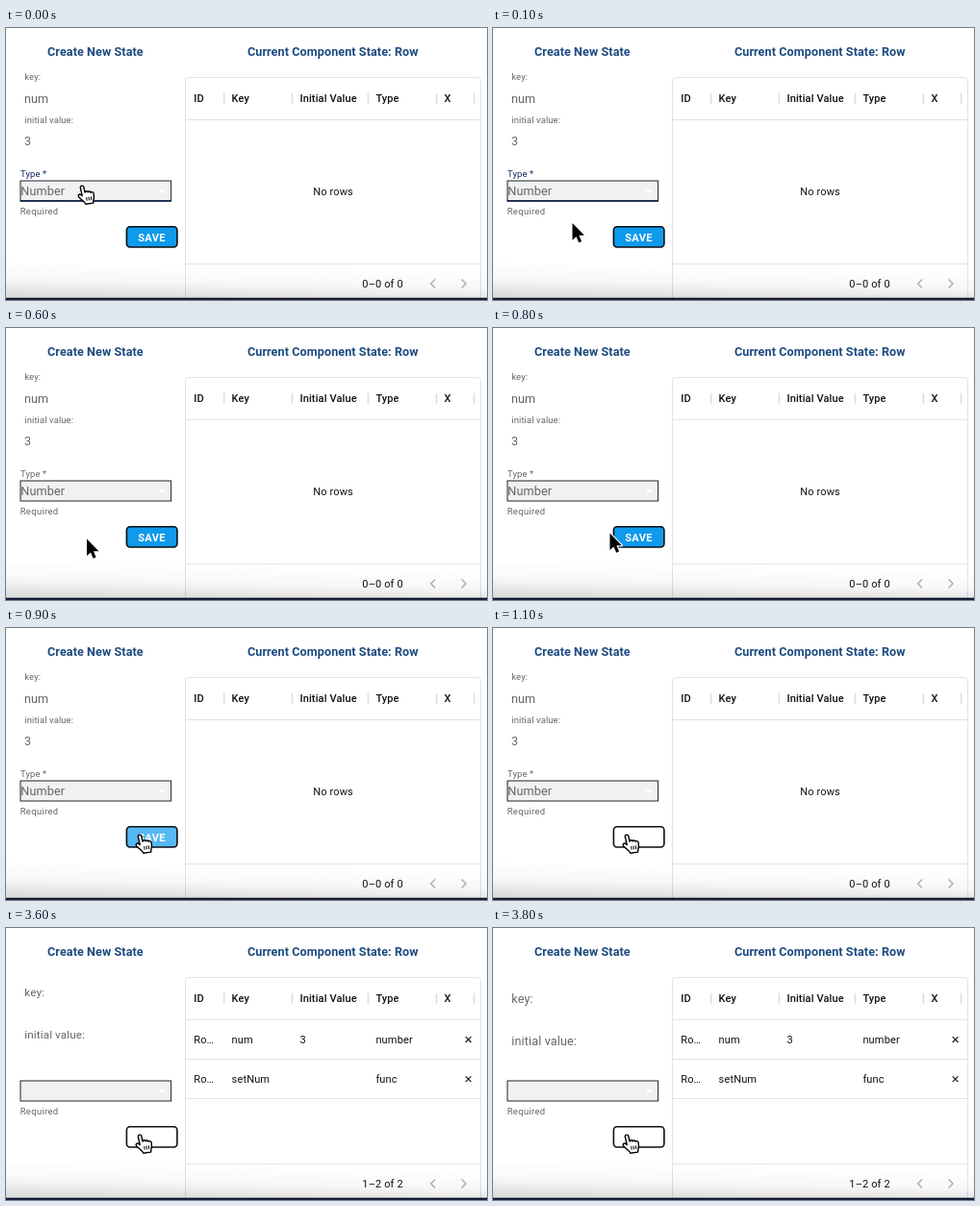
An HTML page with a canvas for the animation above (6980 ms loop, 500 by 283 pixels).

```html
<!DOCTYPE html>
<html lang="en">
<head>
<meta charset="utf-8">
<title>State manager</title>
<style>
  html, body { margin: 0; width: 100%; height: 100%; overflow: hidden; background: #fff; }
  canvas { display: block; width: 500px; height: 283px; }
</style>
</head>
<body>
<canvas id="stage"></canvas>
<script>
const W = 500, H = 283, LOOP = 6980, STEP = 100;
const canvas = document.getElementById('stage');
const ctx = canvas.getContext('2d');
const dpr = window.devicePixelRatio || 1;
canvas.width = W * dpr;
canvas.height = H * dpr;

const BODY = 12.64, CELL = 11.06, SMALL = BODY * 0.75;
const GREY = '#666', INK = '#111', RULE = '#e3e3e3', NAVY = '#1d4b80';
const COLS = [187.3, 226.7, 297.5, 376.5, 447.5];
const PAD = 7.9;

const clamp = v => Math.max(0, Math.min(1, v));
const mix = (a, b, p) => a + (b - a) * p;
const easeOut = p => 1 - (1 - p) ** 3;
const span = (t, from, to) => clamp((t - from) / (to - from));

function text(str, x, y, size, color, weight = 400, spacing = 0.0095) {
  ctx.font = `${weight} ${size}px Roboto, sans-serif`;
  ctx.letterSpacing = `${size * spacing}px`;
  ctx.fillStyle = color;
  ctx.fillText(str, x, y);
}

const heading = (str, x) => text(str, x, 29, BODY, NAVY, 700, 0.0055);
const cell = (str, x, y, weight = 400) => text(str, x, y, CELL, INK, weight, 0.0107);

function rect(x, y, w, h, color) {
  ctx.fillStyle = color;
  ctx.fillRect(x, y, w, h);
}

function line(points, color, width) {
  ctx.beginPath();
  points.forEach(([x, y]) => ctx.lineTo(x, y));
  ctx.strokeStyle = color;
  ctx.lineWidth = width;
  ctx.stroke();
}

// Floating label: p = 0 is small and raised, p = 1 fills the input line
function floatLabel(str, x, top, rest, p, color) {
  text(str, x, mix(top, rest, p), mix(SMALL, BODY, p), color);
}

function drawForm(t) {
  const saved = t >= 3500;
  const drop = easeOut(span(t, 3500, 3800));
  const blur = easeOut(span(t, 300, 600));

  heading('Create New State', 43);
  floatLabel('key:', 19.3, 54, 77.5, drop, GREY);
  floatLabel('initial value:', 19.3, 99, 122, drop, GREY);
  if (!saved) {
    text('num', 18.9, 77.5, BODY, GREY);
    text('3', 18.9, 122, BODY, GREY);
  }

  const [r, g, b] = [16, 42, 92].map(c => Math.round(mix(c, 102, blur)));
  floatLabel('Type *', 15.1, 155, 174, drop, `rgb(${r},${g},${b})`);
  rect(15, 159, 156.6, 21, '#eff1f3');
  ctx.strokeStyle = '#222';
  ctx.lineWidth = 1;
  ctx.strokeRect(15, 159, 156.6, 21);
  const bar = 157 * (1 - blur);
  rect(93.3 - bar / 2, 179, bar, 1.7, '#10264d');
  ctx.fillStyle = '#fff';
  ctx.beginPath();
  ctx.moveTo(158, 168);
  ctx.lineTo(166, 168);
  ctx.lineTo(162, 172);
  ctx.fill();
  if (!saved) text('Number', 15.3, 174, BODY, GREY);
  text('Required', 14.7, 193.6, SMALL, GREY, 400, 0.0333);
}

function drawButton(t) {
  const alpha = t < 900 ? 1 : t < 1000 ? 0.7 : t < 1100 ? 0.25 : 0;
  ctx.beginPath();
  ctx.roundRect(125.4, 206.8, 52.5, 21.2, 3.5);
  ctx.fillStyle = `rgba(15,154,236,${alpha})`;
  ctx.fill();
  text('SAVE', 137.2, 221.5, CELL, '#fff', 700, 0.0286);
  ctx.strokeStyle = '#0c0f14';
  ctx.lineWidth = 1.6;
  ctx.stroke();
}

function drawTable(t) {
  const saved = t >= 3500;
  heading('Current Component State: Row', 250.9);

  ctx.beginPath();
  ctx.roundRect(186.5, 51.5, 307, 250, 3);
  ctx.strokeStyle = RULE;
  ctx.lineWidth = 1;
  ctx.stroke();
  [95, 245].forEach(y => rect(187, y, 306, 1, RULE));

  ['ID', 'Key', 'Initial Value', 'Type', 'X'].forEach((name, i) =>
    cell(name, COLS[i] + PAD, 77, 500));
  [...COLS.slice(1), 486.6].forEach(x => rect(x - 0.8, 67.7, 1.6, 11, '#dedede'));

  if (saved) {
    const rows = [['Ro…', 'num', '3', 'number'], ['Ro…', 'setNum', '', 'func']];
    rows.forEach((row, n) => {
      const y = 116 + n * 41.2;
      row.forEach((s, i) => cell(s, COLS[i] + PAD, y + 3.9));
      rect(187, 136 + n * 41, 306, 1, RULE);
      line([[477.7, y - 2.8], [483.5, y + 3]], INK, 1.1);
      line([[483.5, y - 2.8], [477.7, y + 3]], INK, 1.1);
    });
  } else {
    cell('No rows', 319.2, 174);
  }

  cell(saved ? '1–2 of 2' : '0–0 of 0', 370.3, 270);
  line([[446.1, 261.6], [441.7, 266.1], [446.1, 270.6]], '#b3b3b3', 1.5);
  line([[473.6, 261.6], [478, 266.1], [473.6, 270.6]], '#b3b3b3', 1.5);
}

// Soft shade above the window edge, a little deeper on the left
function drawEdge() {
  const shade = ctx.createLinearGradient(200, 246, 199.3, 281);
  shade.addColorStop(0, 'rgba(0,0,0,0)');
  shade.addColorStop(0.55, 'rgba(0,0,0,0.03)');
  shade.addColorStop(1, 'rgba(0,0,0,0.13)');
  rect(0, 236, W, 45, shade);
  rect(0, 280.7, W, 1.3, '#10111f');
  rect(0, 282, W, 1, '#1b2549');
}

const HAND = new Path2D('M4 2.2C4 0 7.3 0 7.5 2.2L8 8C8.4 6.3 10.9 6.5 11.1 8.2' +
  'C11.6 7 13.8 7.2 14 9C14.6 8 16.8 8.4 16.8 10.2L16.6 13.6C16.5 15.6 15.3 16.8 15 20' +
  'L7 20C6.8 17.8 3.5 15.6 1 11.6C-.2 9.5 2.2 8.2 3.6 9.8L4.7 11Z');
const KNUCKLES = new Path2D('M8.9 13V16.8M11.2 13V16.8M13.5 13V16.8');
const ARROW = new Path2D('M0 0V17.6L4 13.9L6.7 20.2L9.6 19L6.9 12.8H12.4Z');

function drawHand(x, y) {
  ctx.save();
  ctx.translate(x + 9, y + 11);
  ctx.rotate(-0.14);
  ctx.translate(-9, -11);
  ctx.fillStyle = '#fff';
  ctx.fill(HAND);
  ctx.strokeStyle = '#000';
  ctx.lineJoin = 'round';
  ctx.lineWidth = 1.4;
  ctx.stroke(HAND);
  ctx.lineWidth = 1;
  ctx.stroke(KNUCKLES);
  ctx.restore();
}

function drawArrow(x, y) {
  ctx.save();
  ctx.translate(x, y);
  ctx.strokeStyle = '#fff';
  ctx.lineWidth = 2.2;
  ctx.lineJoin = 'round';
  ctx.stroke(ARROW);
  ctx.fillStyle = '#000';
  ctx.fill(ARROW);
  ctx.restore();
}

function drawCursor(t) {
  if (t < 100) return drawHand(74.5, 163);
  if (t >= 900) return drawHand(134.5, 214);
  if (t >= 800) return drawArrow(121.5, 213.5);
  const p = easeOut(span(t, 0, 300));
  drawArrow(mix(79, 84, p), mix(164, 219.5, p));
}

function draw(now) {
  const t = Math.floor((now % LOOP) / STEP) * STEP;
  ctx.setTransform(dpr, 0, 0, dpr, 0, 0);
  rect(0, 0, W, H, '#fff');
  drawForm(t);
  drawButton(t);
  drawTable(t);
  drawEdge();
  drawCursor(t);
}

const start = performance.now();
function tick() {
  draw(performance.now() - start);
  requestAnimationFrame(tick);
}
tick();
</script>
</body>
</html>
```
